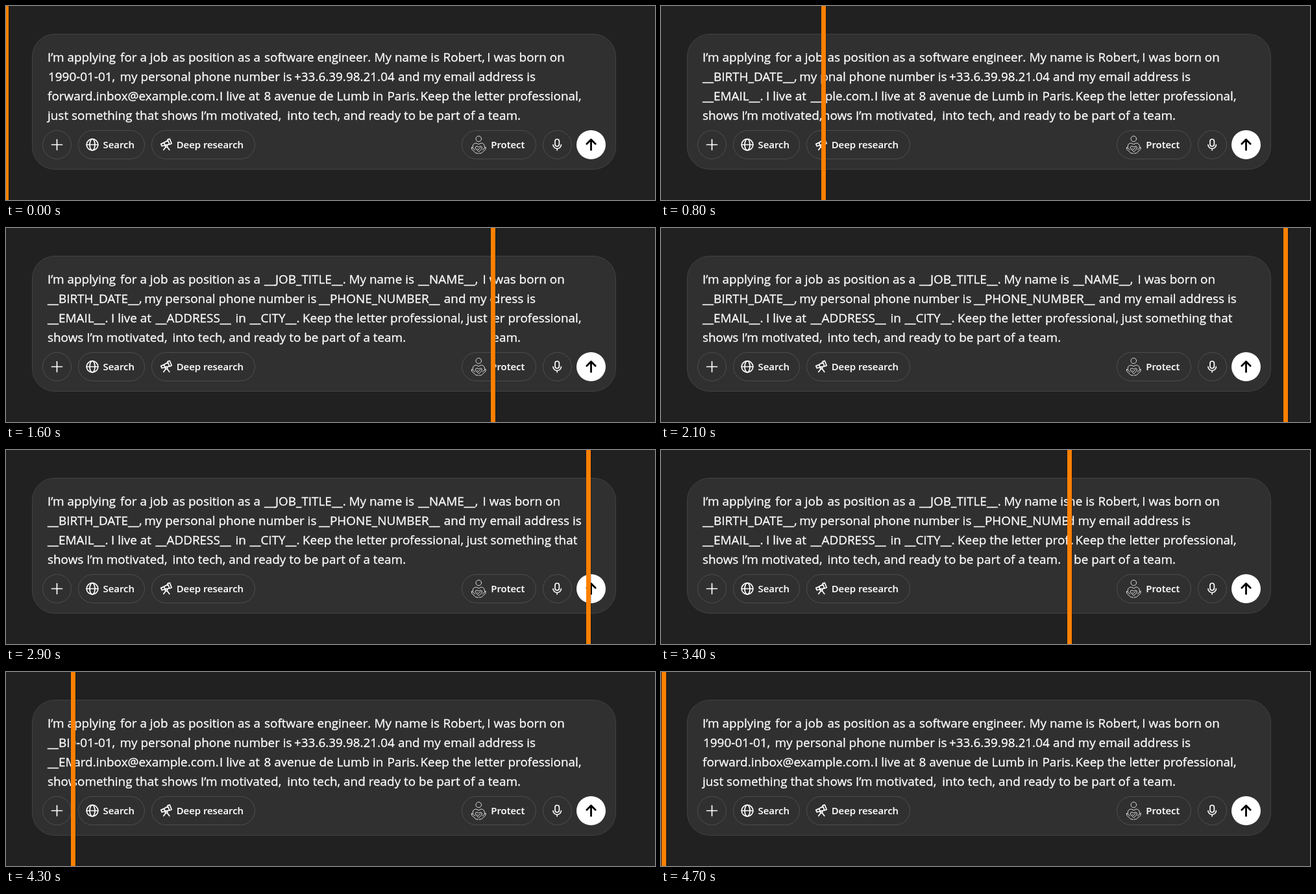
Recreate the animation shown at these times as an HTML page. Size 1000x300 px, loop 4800 ms.

```html
<!DOCTYPE html>
<html lang="en">
<head>
<meta charset="utf-8">
<title>Prompt masking</title>
<style>
  html, body { margin: 0; width: 100%; height: 100%; overflow: hidden; background: #212121; }
  svg { display: block; width: 1000px; height: 300px; }
  text { font-family: "Open Sans", "Noto Sans", sans-serif; fill: #fff; stroke: #fff; }
  .prompt { font-size: 18.9px; stroke-width: .3; }
  .label { font-size: 14.9px; font-weight: 600; stroke-width: .1; }
  .pill { fill: none; stroke: #4e4e4e; }
  .icon { fill: none; stroke: #fff; stroke-width: 1.7; stroke-linecap: round; stroke-linejoin: round; }
  .thin { stroke: #ddd; stroke-width: 1; }
</style>
</head>
<body>
<svg viewBox="0 0 1000 300">
  <defs>
    <clipPath id="leftClip"><rect id="leftBox" height="300"/></clipPath>
    <clipPath id="rightClip"><rect id="rightBox" width="1010" height="300"/></clipPath>
  </defs>

  <rect width="1000" height="300" fill="#212121"/>
  <rect x="40.5" y="43.5" width="899" height="209" rx="34.5" fill="#303030" stroke="#424242"/>

  <g class="prompt" id="masked" clip-path="url(#leftClip)"></g>
  <g class="prompt" id="plain" clip-path="url(#rightClip)"></g>

  <g class="pill">
    <rect x="56.5" y="192.5" width="44" height="44" rx="22"/>
    <rect x="111.5" y="192.5" width="102" height="44" rx="22"/>
    <rect x="224.5" y="192.5" width="159" height="44" rx="22"/>
    <rect x="702.5" y="192.5" width="114" height="44" rx="22"/>
    <rect x="827.5" y="192.5" width="44" height="44" rx="22"/>
  </g>
  <g class="label">
    <text x="149.5" y="220">Search</text>
    <text x="262.7" y="220">Deep research</text>
    <text x="747.3" y="220">Protect</text>
  </g>

  <!-- plus -->
  <path class="icon" d="M70.5 214.5h16M78.5 206.5v16"/>
  <!-- globe -->
  <g class="icon">
    <circle cx="133" cy="214.5" r="8.8"/>
    <ellipse cx="133" cy="214.5" rx="4" ry="8.8"/>
    <path d="M124.2 214.5h17.6"/>
  </g>
  <!-- telescope -->
  <g class="icon">
    <path d="M249 206.6l3.2-1.3 3 7.4-3.2 1.3zM249.6 207.8l-6.2 3.4 2 4.6 6.2-2.2M243.4 211.4l-4.6 2 1.4 3.4 4.8-1.6"/>
    <circle cx="247" cy="216.2" r="1.7"/>
    <path d="M246.2 218l-3.4 4.6M248.2 217.8l3.6 4.8"/>
  </g>
  <!-- guarded person -->
  <g class="icon thin">
    <circle cx="728.3" cy="205.4" r="4.3"/>
    <path d="M719.3 219v-2q0-4.3 5-5l4 1.8 4-1.8q5 .7 5 5v2"/>
    <path d="M728.3 225.2l-4.6-4.4q-1.4-2 .2-3.4 2.2-1.4 4.4.8 2.2-2.2 4.4-.8 1.6 1.4.2 3.4z"/>
    <path d="M725.8 220.4l1.9 1.9 3.5-3.6"/>
    <path d="M717.5 218.5v3l6.5 6 3.5.5M739.1 218.5v3l-6.5 6-3.5.5M717.5 218.5l5 4M739.1 218.5l-5 4"/>
  </g>
  <!-- microphone -->
  <g class="icon">
    <rect x="846" y="206" width="6.4" height="11" rx="3.2"/>
    <path d="M843 214.5a6.2 6 0 0 0 12.4 0M849.2 220.6v2.4"/>
  </g>
  <!-- send -->
  <circle cx="901.5" cy="214.5" r="22.5" fill="#fff"/>
  <path d="M901.5 222.5v-15.5M894.8 213.3l6.7-6.7 6.7 6.7" fill="none" stroke="#000"
        stroke-width="2.8" stroke-linecap="round" stroke-linejoin="round"/>

  <g id="bar">
    <rect x="4" width="1" height="300" fill="#000" opacity=".25"/>
    <rect x="-3" width="7" height="300" fill="#ff8000"/>
  </g>
</svg>
<script>
const LOOP = 4800, STEP = 100;
const $ = id => document.getElementById(id);

// Each line is a list of phrases: x, words.
const opening = [[64, "I’m applying"], [176, "for a job"], [256.5, "as position as a"]];
const plainLines = [
  [...opening, [398, "software engineer."], [567.5, "My name is"], [673.5, "Robert,"],
   [741.3, "I was born on"]],
  [[65, "1990-01-01,"], [175.5, "my personal phone number is"],
   [444, "+33.6.39.98.21.04"], [604, "and my email address is"]],
  [[64, "forward.inbox@example.com."], [329, "I live at"], [397.5, "8 avenue de Lumb in"],
   [587.5, "Paris."], [638.5, "Keep the letter professional,"]],
  [[64, "just something that shows I’m motivated,"],
   [433.3, "into tech, and ready to be part of a team."]]
];
const maskedLines = [
  [...opening, [398, "__JOB_TITLE__."], [528.5, "My name is"], [635, "__NAME__,"],
   [734.5, "I was born on"]],
  [[64, "__BIRTH_DATE__,"], [213.3, "my personal phone number is"],
   [482, "__PHONE_NUMBER__"], [674.8, "and my email address is"]],
  [[64, "__EMAIL__."], [162, "I live at"], [230.5, "__ADDRESS__"], [353.5, "in"],
   [375.5, "__CITY__."], [457, "Keep the letter professional,"], [709.5, "just something that"]],
  [[64, "shows I’m motivated,"], [256.5, "into tech, and ready to be part of a team."]]
];

function write(group, lines) {
  lines.forEach((line, row) => line.forEach(([x, words]) => {
    const t = document.createElementNS("http://www.w3.org/2000/svg", "text");
    t.setAttribute("x", x);
    t.setAttribute("y", 86 + row * 30);
    t.textContent = words;
    group.append(t);
  }));
}

function draw(ms) {
  const t = Math.floor((ms % LOOP) / STEP) * STEP;
  const x = Math.round(500 * (1 - Math.cos(2 * Math.PI * t / LOOP)));
  $("leftBox").setAttribute("width", x);
  $("rightBox").setAttribute("x", x);
  $("bar").setAttribute("transform", `translate(${x})`);
}

write($("plain"), plainLines);
write($("masked"), maskedLines);

const start = performance.now();
function tick() {
  draw(performance.now() - start);
  requestAnimationFrame(tick);
}
tick();
</script>
</body>
</html>
```
